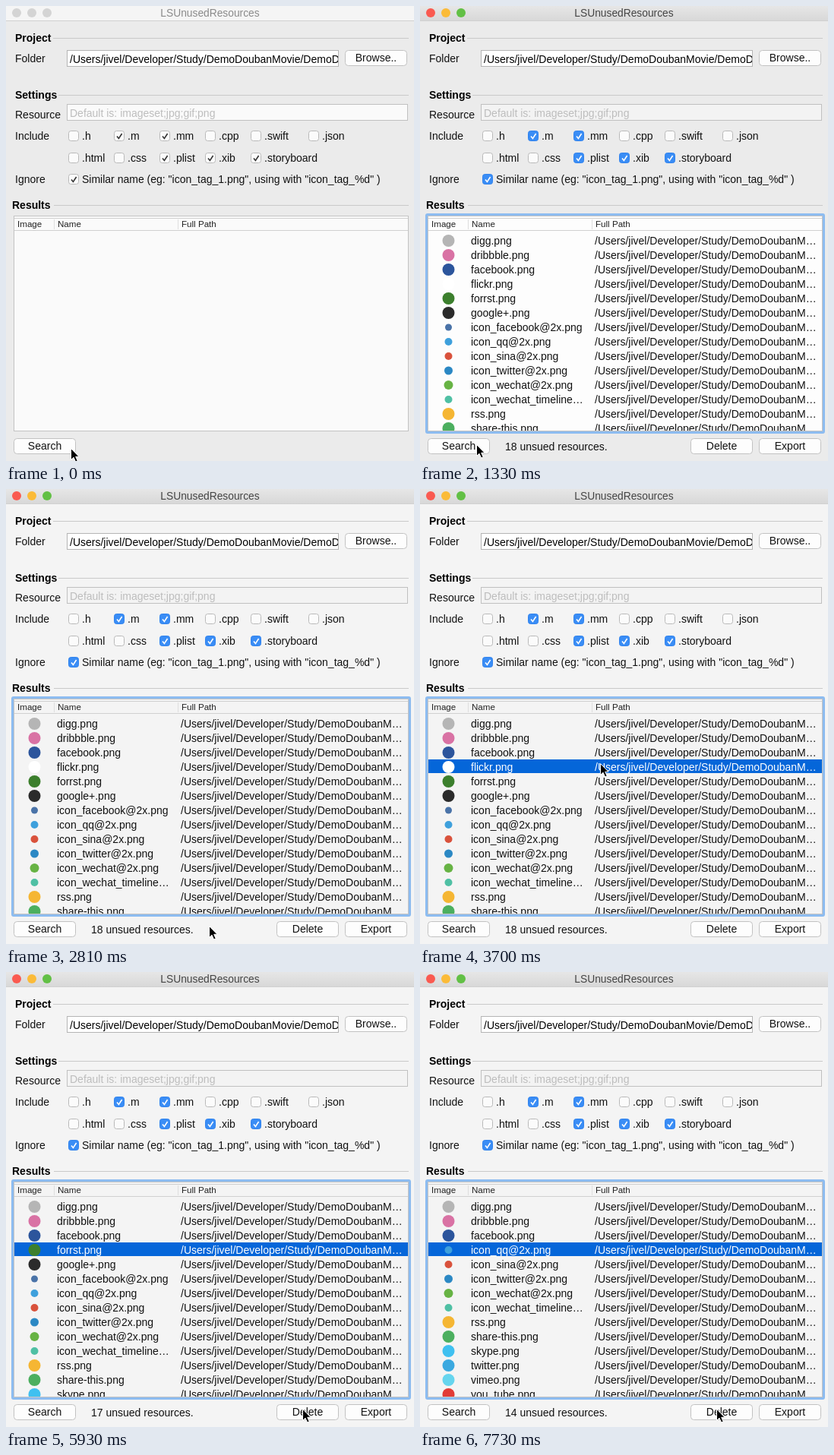
Recreate the animation shown at these times as an HTML page. Size 537 px wide and 599 px high, loop 8 s.

```html
<!DOCTYPE html>
<html lang="en">
<head>
<meta charset="utf-8">
<title>LSUnusedResources</title>
<style>
  html, body { margin: 0; width: 100%; height: 100%; overflow: hidden; }
  svg { display: block; width: 537px; height: 599px; }
  text { font: 14px "Liberation Sans", Arial, sans-serif; white-space: pre; }
</style>
</head>
<body>
<svg id="stage" viewBox="0 0 537 599"></svg>
<script>
const LOOP = 8000;
const T = { press: 1030, release: 1180, results: 1330, settle: 2080, select: 3700, deletePress: 6680 };
const DELETIONS = [5930, 6830, 7280, 7730];
const USER_PATH = '/Users/jivel/Developer/Study/DemoDoubanM';

// start time, window background, list background
const SHADES = [
  [0, '#ebebeb', '#fafafa'], [T.press, '#f3f3f3', '#f4f4f4'],
  [T.results, '#ebebeb', '#fdfdfd'], [T.settle, '#f4f4f4', '#f4f4f4']
];

// time, x, y of the pointer tip; each position holds until the next
const POINTER = [
  [0, 85, 582], [140, 79, 579], [290, 74, 577],
  [1630, 165, 540], [1780, 267, 517],
  [2080, 262, 535], [2230, 258, 552], [2380, 258, 566], [2530, 260, 573], [2680, 264, 576],
  [2810, 267, 575], [2960, 280, 480], [3110, 290, 392], [3250, 262, 372], [3400, 237, 361],
  [4150, 250, 382], [4300, 280, 430], [4430, 310, 477], [4580, 337, 518], [4730, 353, 530],
  [5030, 368, 545], [5180, 382, 562], [5330, 390, 575]
];

// name, icon colour, icon radius
const FILES = [
  ['digg.png', '#b5b5b5', 8], ['dribbble.png', '#d972a4', 8], ['facebook.png', '#2c559c', 8],
  ['flickr.png', '#fff', 8], ['forrst.png', '#3c7f2d', 8], ['google+.png', '#2b2b2b', 8],
  ['icon_facebook@2x.png', '#4a73a8', 4.5], ['icon_qq@2x.png', '#3ea0dc', 5],
  ['icon_sina@2x.png', '#d9523c', 5], ['icon_twitter@2x.png', '#2b88c4', 5.5],
  ['icon_wechat@2x.png', '#67b344', 6], ['icon_wechat_timeline…', '#4fc0a4', 5],
  ['rss.png', '#f5b633', 8], ['share-this.png', '#4caf5f', 8], ['skype.png', '#3fc0f0', 8],
  ['twitter.png', '#3ba9e0', 8], ['vimeo.png', '#66d5ee', 8], ['you_tube.png', '#e23c37', 8]
];

// label, x, y, checked
const OPTIONS = [
  ['.h', 82, 164], ['.m', 142, 164, true], ['.mm', 202, 164, true],
  ['.cpp', 262, 164], ['.swift', 322, 164], ['.json', 398, 164],
  ['.html', 82, 193], ['.css', 142, 193], ['.plist', 202, 193, true],
  ['.xib', 262, 193, true], ['.storyboard', 322, 193, true],
  ['Similar name (eg: "icon_tag_1.png", using with "icon_tag_%d" )', 82, 221, true]
];

const at = (table, t) => table.findLast(row => row[0] <= t);
const text = (s, x, y, fill = '#111', style = '', extra = '') =>
  `<text x="${x}" y="${y}" fill="${fill}" style="${style}" ${extra}>${s}</text>`;
const rect = (x, y, w, h, fill, extra = '') =>
  `<rect x="${x}" y="${y}" width="${w}" height="${h}" fill="${fill}" ${extra}/>`;
const box = (x, y, w, h, fill, stroke, r = 0) =>
  rect(x + .5, y + .5, w - 1, h - 1, fill, `stroke="${stroke}" rx="${r}"`);
const circle = (x, y, r, fill) => `<circle cx="${x}" cy="${y}" r="${r}" fill="${fill}"/>`;

const heading = (s, x, y, lineX) =>
  text(s, x, y, '#000', 'font-weight:bold') + rect(lineX, y - 5, 530 - lineX, 1, '#c9c9c9');

function button(label, x, y, pressed) {
  return box(x, y, 82, 21, pressed ? 'url(#blue)' : '#fdfdfd', pressed ? '#1d74e0' : '#c2c2c2', 4) +
    text(label, x + 41, y + 15, pressed ? '#fff' : '#111', '', 'text-anchor="middle"');
}

function checkbox([label, x, y, checked], active) {
  const on = checked && active;
  const tick = `<path d="M${x + 4} ${y + 7.5}l2.4 3 4.2-6.5" fill="none" stroke="${on ? '#fff' : '#333'}" stroke-width="1.6"/>`;
  return box(x, y, 14, 14, on ? '#3a8df5' : '#fbfbfb', on ? '#3083ee' : '#b9b9b9', 3) +
    (checked ? tick : '') + text(label, x + 18, y + 12);
}

function titleBar(active) {
  const lights = active ? ['#fa5a50', '#fbbb38', '#62c045'] : ['#d4d4d4', '#d4d4d4', '#d4d4d4'];
  return rect(0, 0, 537, 19, active ? 'url(#bar)' : '#f5f5f5') + rect(0, 19, 537, 1, '#d0d0d0') +
    lights.map((c, i) => circle(14 + 20 * i, 9, 6, c)).join('') +
    text('LSUnusedResources', 268.5, 14, active ? '#444' : '#8a8a8a', 'font-size:13.8px', 'text-anchor="middle"');
}

function form(active) {
  return heading('Project', 12, 47, 62) + text('Folder', 12, 74) +
    box(80, 58, 358, 22, '#fff', '#b4b4b4') +
    text(USER_PATH + 'ovie/DemoD', 84, 75, '#000', '', 'clip-path="url(#field)"') +
    button('Browse..', 446, 58) +
    heading('Settings', 12, 122, 69) + text('Resource', 12, 148) +
    box(80, 129, 449, 22, active ? '#f3f3f3' : '#fafafa', '#c0c0c0') +
    text('Default is: imageset;jpg;gif;png', 84, 146, '#bdbdbd') +
    text('Include', 12, 176) + text('Ignore', 12, 233) +
    OPTIONS.map(o => checkbox(o, active)).join('') +
    heading('Results', 8, 267, 63);
}

function fileRow([name, color, radius], i, selected) {
  const y = 299 + 19 * i, ink = selected ? '#fff' : '#111';
  return (selected ? rect(11, y, 518, 18, '#0566d9') : '') +
    circle(37.5, y + 10, radius, color) +
    text(name, 67, y + 15, ink) + text(USER_PATH + '…', 230, y + 15, ink);
}

function table(t, files, fill) {
  const head = (s, x) => text(s, x, 291, '#222', 'font-size:11.6px');
  const ring = t < T.press ? '' :
    '<rect x="8.5" y="274.5" width="523" height="287" rx="1.5" fill="none" stroke="#8dbcf0" stroke-width="3"/>';
  return box(10, 276, 520, 284, fill, '#c3c3c3') +
    rect(11, 279, 518, 1, '#d0d0d0') + rect(11, 295, 518, 1, '#d0d0d0') +
    rect(63, 281, 1, 13, '#dedede') + rect(226, 281, 1, 13, '#dedede') +
    head('Image', 15) + head('Name', 68) + head('Full Path', 231) +
    `<g clip-path="url(#list)">${files.map((f, i) => fileRow(f, i, i === 3 && t >= T.select)).join('')}</g>` + ring;
}

function pointer(t) {
  const [, x, y] = at(POINTER, t);
  return `<path transform="translate(${x} ${y})" d="M.5 .5V15.5L4 12.2 6.6 18 9.2 16.8 6.7 11.3H11Z" fill="#000" stroke="#fff"/>`;
}

const DEFS = `<defs>
  <linearGradient id="blue" x2="0" y2="1"><stop stop-color="#4f9df8"/><stop offset="1" stop-color="#0f6ae6"/></linearGradient>
  <linearGradient id="bar" x2="0" y2="1"><stop stop-color="#e6e6e6"/><stop offset="1" stop-color="#d8d8d8"/></linearGradient>
  <clipPath id="field"><path d="M81 59H437V79H81Z"/></clipPath>
  <clipPath id="list"><path d="M11 296H529V559H11Z"/></clipPath>
</defs>`;

function scene(t) {
  const active = t >= T.press, found = t >= T.results;
  const deleted = DELETIONS.filter(d => d <= t).length;
  const files = found ? FILES.filter((_, i) => i < 3 || i >= 3 + deleted) : [];
  const [, background, listFill] = at(SHADES, t);
  return DEFS + rect(0, 0, 537, 599, background) +
    titleBar(active) + form(active) + table(t, files, listFill) +
    button('Search', 10, 569, active && t < T.release) +
    (found ? text(`${files.length} unsued resources.`, 112, 585) +
      button('Delete', 356, 569, t >= T.deletePress && t < DELETIONS[1]) +
      button('Export', 446, 569) : '') +
    pointer(t);
}

const stage = document.getElementById('stage');
let shown = '';
function draw() {
  const markup = scene(performance.now() % LOOP);
  if (markup !== shown) stage.innerHTML = shown = markup;
  requestAnimationFrame(draw);
}
draw();
</script>
</body>
</html>
```
